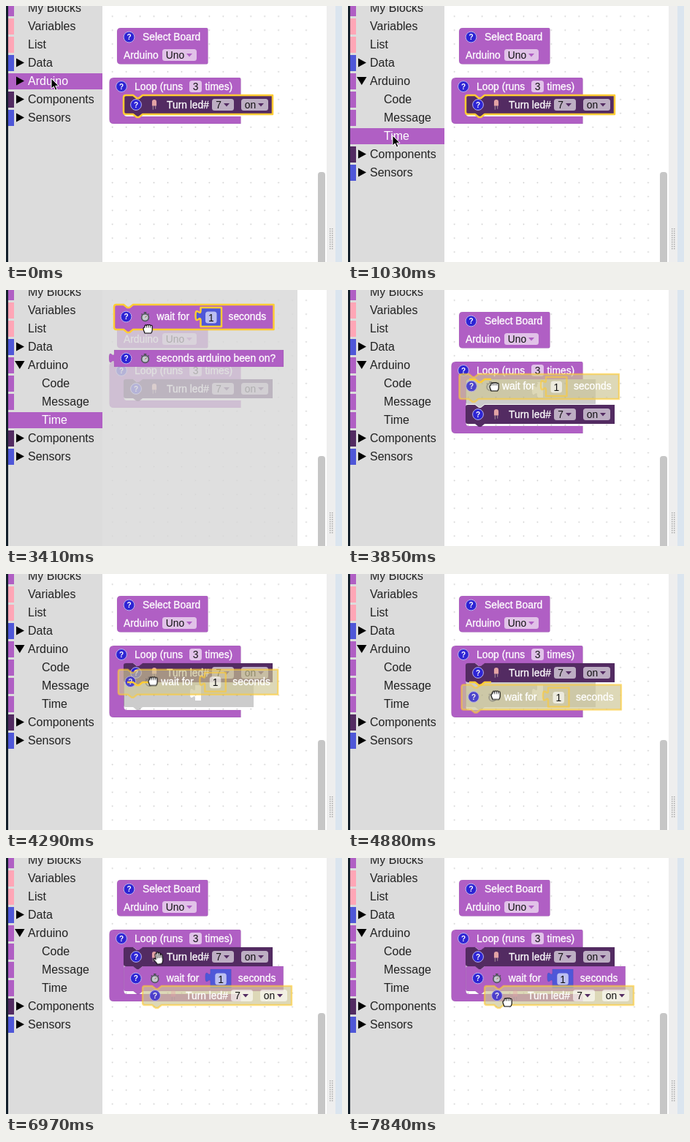
An HTML page for the animation above (7990 ms loop, 460 by 350 pixels).

```html
<!DOCTYPE html>
<html lang="en">
<head>
<meta charset="utf-8">
<title>Block editor</title>
<style>
html, body { margin: 0; width: 100%; height: 100%; overflow: hidden; background: #fff; }
svg { display: block; width: 460px; height: 350px; }
text { font-family: "Liberation Sans", Arial, sans-serif; font-size: 13.85px; white-space: pre; }
.row { font-size: 16px; fill: #222; }
.label { fill: #fff; stroke: #fff; stroke-width: .3px; }
.value { fill: #111; text-anchor: middle; }
.mark { font-size: 10px; font-weight: bold; fill: #fff; text-anchor: middle; }
.body { stroke: #000; stroke-opacity: .08; stroke-width: .8px; }
.sel { fill: none; stroke: #fc3; stroke-width: 2.5px; stroke-linejoin: round; }
.ghost .body { fill: #cdc696; fill-opacity: .68; stroke: none; }
.ghost .sel { stroke-opacity: .6; }
.ghost .help { opacity: .8; }
.ghost .pic { opacity: .4; }
.hand { fill: #fff; stroke: #000; stroke-width: 1.1px; stroke-linejoin: round; }
.fingers { stroke: #000; stroke-width: .8px; }
</style>
</head>
<body>
<svg id="stage" viewBox="0 0 460 350"></svg>
<script>
const LOOP = 7990, TICKS = 54;
const PURPLE = '#b05fc4', DARK = '#532b62', BLUE = '#4f57d8', PINK = '#ffa6b6';

// Drawing helpers
const at = (x, y, content) => `<g transform="translate(${x} ${y})">${content}</g>`;
const g = (id, content, x = 0, y = 0) => `<g id="${id}">${at(x, y, content)}</g>`;
const rect = (x, y, w, h, fill, r = 0) =>
  `<rect x="${x}" y="${y}" width="${w}" height="${h}" rx="${r}" fill="${fill}"/>`;
const label = (x, y, s) => `<text class="label" x="${x}" y="${y}">${s}</text>`;
const body = (d, fill) => `<path class="body" d="${d}" fill="${fill}"/>`;
const outline = d => `<path class="sel" d="${d}"/>`;

const help = (x, y) => `<g class="help"><circle cx="${x}" cy="${y}" r="7.4" fill="#2d24d4" stroke="#b9b4ee"/>
  <text class="mark" x="${x}" y="${y + 3.6}">?</text></g>`;

const field = (x, y, w, s, arrow) => rect(x, y, w, 16, 'rgba(255,255,255,.62)', 3.5) +
  `<text class="value" x="${x + (w - (arrow ? 12 : 0)) / 2}" y="${y + 13}">${s}</text>` +
  (arrow ? `<path d="M${x + w - 14} ${y + 6}h8l-4 4.5z" fill="${arrow}"/>` : '');

const watch = (x, y) => `<g class="pic" transform="translate(${x} ${y})">
  <path d="M-1.8 -5.8h3.6M0 -5.5v2M4 -4l1 1M-4 -4l-1 1" stroke="#4a4c55" stroke-width="1.6"/>
  <circle cy="1" r="4.9" fill="#c3c9cf" stroke="#55575f" stroke-width="1.7"/>
  <path d="M0 1L2 -1" stroke="#a44"/></g>`;

const bulb = (x, y) => `<g class="pic" transform="translate(${x} ${y}) scale(.85)">
  <path d="M-2 3v6M2 3v5" stroke="#a58f98" stroke-width="1.2"/>
  <path d="M-3.6 3V-3.5a3.6 3.6 0 0 1 7.2 0V3z" fill="#e3a3a5"/></g>`;

// Block outlines
const stack = (w, h) => `M3 0H13l5 4h3l5 -4H${w}V${h}H26l-5 4h-3l-5 -4H3q-3 0 -3 -3V3q0 -3 3 -3z`;
const plain = (w, h) => `M5 0H${w - 2}q2 0 2 2V${h - 2}q0 2 -2 2H5q-5 0 -5 -5V5q0 -5 5 -5z`;
const plug = (x, y, w, h) => `M${x + w} ${y}H${x}v4c0 9 -7 -7 -7 7s7 -2 7 7V${y + h}H${x + w}z`;
const cShape = h => `M6 0H178q2 0 2 2V24H46l-5 4h-3l-5 -4H24q-4 0 -4 4V${h - 14}q0 4 4 4H180V${h}H6q-6 0 -6 -6V6q0 -6 6 -6z`;

const WAIT = stack(218.5, 34), LED = stack(204, 26), NUM = plug(118.5, 4, 28.5, 26);

const waitBlock = ghost => body(WAIT, PURPLE) + (ghost ? '' : body(NUM, BLUE)) +
  help(16.5, 16.5) + watch(42.5, 16.5) + label(58.5, 21, 'wait for') +
  field(125, 9.5, 15.5, '1') + label(156.5, 21, 'seconds');

const ledBlock = () => body(LED, DARK) + help(17, 13) + bulb(42, 12) + label(59, 18, 'Turn led#') +
  field(121, 5, 30, '7', DARK) + field(161, 5, 37, 'on', DARK);

// Toolbox: rows are 25px apart
const rowY = i => 2.5 + 25 * i;
const closed = i => `<path d="M14 ${rowY(i) - 6}v12l11 -6z"/>`;
const row = (i, color, s, x = 30) => rect(3, rowY(i) - 10.5, 8, 22, color) +
  `<text class="row" x="${x}" y="${rowY(i) + 5.5}">${s}</text>`;
const active = (i, s, x) => rect(3, rowY(i) - 10.5, 129, 22, PURPLE) +
  `<text class="row" style="fill:#fff" x="${x}" y="${rowY(i) + 5.5}">${s}</text>`;

const topRows = [[PURPLE, 'My Blocks'], [PINK, 'Variables'], [PINK, 'List'], [BLUE, 'Data'], [PURPLE, 'Arduino']];
const toolbox = rect(0, 0, 3, 350, '#14202b') + rect(3, 0, 129, 350, '#dcdcdc') +
  topRows.map(([color, s], i) => row(i, color, s)).join('') + closed(3) +
  g('kids', ['Code', 'Message', 'Time'].map((s, i) => row(5 + i, PURPLE, s, 49)).join('')) +
  g('tail', row(5, DARK, 'Components') + closed(5) + row(6, BLUE, 'Sensors') + closed(6)) +
  g('onArduino', active(4, 'Arduino', 30)) + g('onTime', active(7, 'Time', 49)) +
  g('shut', closed(4)) + g('open', '<path d="M12 97h13.5l-6.75 11z"/>');

const workspace = `<defs><pattern id="dots" x="136.2" y="4.5" width="18.95" height="18.95" patternUnits="userSpaceOnUse">
  <circle cx="9.5" cy="9.5" r=".85" fill="#c4c4c4"/></pattern></defs>` +
  rect(132, 0, 295, 350, 'url(#dots)') +
  at(152, 30, body(plain(124.5, 49.5), PURPLE) + help(16.5, 12.5) + label(35, 17, 'Select Board') +
    label(9, 42, 'Arduino') + field(62, 29, 47, 'Uno', PURPLE)) +
  g('loopShort', body(cShape(63), PURPLE), 141.5, 98) + g('loopLong', body(cShape(98), PURPLE), 141.5, 98) +
  at(141, 98, help(17, 12) + label(35, 17, 'Loop (runs') + field(110, 4, 17, '3') + label(131.5, 17, 'times)')) +
  g('marker', `<path d="${stack(178, 34)}${plug(98, 4, 8, 21)}" fill-opacity=".2" fill-rule="evenodd"/>`, 161, 122) +
  g('wait', waitBlock(), 161.3, 148) + g('waitSel', outline(WAIT) + outline(NUM), 161.3, 148) +
  g('led', ledBlock(), 161, 122) + g('ledSel', outline(LED), 161, 122) +
  `<g class="ghost">${g('drag', waitBlock(true) + outline(WAIT) + outline(NUM)) +
    g('copy', ledBlock() + outline(LED), 187, 175)}</g>` +
  g('snap', outline('M5 0H13l5 4h3l5 -4H35'), 161, 122);

const flyout = g('flyout', rect(132, 0, 267, 350, 'rgba(216,216,216,.8)') +
  at(148, 20, waitBlock()) +
  at(148, 82, body(plug(0, 0, 232, 23), PURPLE) + help(16.5, 11.5) + watch(42.5, 11.5) +
    label(58, 16, 'seconds arduino been on?'))) +
  g('pickSel', outline(WAIT), 148, 20) + g('numSel', outline(NUM), 148, 20);

let grip = '';
for (let y = 304; y < 334; y += 3) grip += rect(443, y, 1.5, 1.5, '#aaa') + rect(446, y, 1.5, 1.5, '#aaa');
const frame = g('thumb', rect(427, 0, 10, 400, '#c6c6c6', 4)) +
  rect(439, 0, 12, 350, '#eeeeee') + rect(451, 0, 9, 350, '#dbe5ef') + grip;

const palm = `<g transform="rotate(-10)"><path class="hand" d="M-3 8C-4 5 -7 2 -7 0q1 -2 3 1V-6q1 -2 2.3 0V-7.5q1.2 -2 2.4 0V-6.5q1.2 -2 2.3 0V-4q1.5 -1.5 2.3 0V2q0 3 -2 6z"/>
  <path class="fingers" d="M-1.7 -5v5M.7 -6v6M3 -5v5"/></g>`;
const fist = `<path class="hand" d="M-4 6C-5 3 -6 2 -6 0q0 -2 2 -2v-2q1 -2 2.6 -.5q1 -1.8 2.6 -.3q1.2 -1.5 2.6 .2q2.4 -.8 2.4 1.5V2q0 2 -1.5 4z"/>
  <path class="fingers" d="M-1.4 -4v2.5M1.2 -4.5v3M3.8 -4v2.5"/>`;
const cursors =
  g('arrow', '<path d="M0 0V14l3.3 -3 2.3 5.2 2.4 -1 -2.3 -5h4.4z" stroke="#fff"/>') +
  g('hand', g('palm', palm) + g('fist', fist));

document.getElementById('stage').innerHTML = workspace + frame + flyout + toolbox + cursors;

// Time runs in ticks; keys are slightly early so rounding never delays a change
const anims = {};
let css = '';
const percent = tick => Math.max(0, tick / TICKS * 100 - 10 / LOOP * 100).toFixed(3);

function track(id, kind, keys) {
  const first = keys[0], last = keys[keys.length - 1];
  const all = [[0, first[1]], ...keys.filter(k => k[0] > 0)];
  css += `@keyframes ${id}-${kind}{` +
    all.map(([tick, rule], i) => {
      const n = i + 1 < all.length ? all[i + 1][0] - tick : 1;
      const timing = kind === 'glide' ? `;animation-timing-function:steps(${n},end)` : '';
      return `${percent(tick)}%{${rule}${timing}}`;
    }).join('') + `100%{${last[1]}}}\n`;
  (anims[id] ||= []).push(`${id}-${kind} ${LOOP}ms step-end infinite`);
}

// Visible from the first time to the second, and so on
function show(id, ...times) {
  const keys = times.map((t, i) => [t, `visibility:${i % 2 ? 'hidden' : 'visible'}`]);
  track(id, 'show', times[0] > 0 ? [[0, 'visibility:hidden'], ...keys] : keys);
}
const places = points => points.map(([t, x, y]) => [t, `transform:translate(${x}px,${y}px)`]);
const hop = (id, ...points) => track(id, 'hop', places(points));
const glide = (id, ...points) => track(id, 'glide', places(points));

const OPEN = 1, PICK_TIME = 7, FLYOUT = 8, PRESS = 21, LIFT = 24, SNAP = 26, BELOW = 29, DROP = 34, SELECT = 38, PASTE = 47;

show('kids', OPEN);
show('open', OPEN);
show('shut', 0, OPEN);
hop('tail', [0, 0, 0], [OPEN, 0, 75]);
show('onArduino', 0, PICK_TIME);
show('onTime', PICK_TIME, LIFT);
show('flyout', FLYOUT, LIFT);
show('pickSel', 18, LIFT);
show('numSel', PRESS, LIFT);

show('loopShort', 0, SNAP);
show('loopLong', SNAP);
for (const id of ['marker', 'snap']) {
  show(id, SNAP, DROP);
  hop(id, [0, 0, 0], [BELOW, 0, 26]);
}
hop('led', [0, 0, 0], [SNAP, 0, 35], [BELOW, 0, 0]);
show('ledSel', 0, PRESS, SELECT, PASTE);
show('wait', DROP);
show('waitSel', DROP, SELECT);
show('copy', PASTE);
hop('thumb', [0, 0, 227], [DROP, 0, 214], [PASTE, 0, 212]);

show('drag', LIFT, DROP);
glide('drag', [23, 148, 20], [SNAP, 152.5, 115], [33, 155.5, 151.5]);

show('arrow', 0, 15);
glide('arrow', [3, 62, 99], [PICK_TIME, 61, 177], [11, 61, 177], [15, 225, -10]);

show('palm', 17, PRESS, DROP, 53);
show('fist', PRESS, DROP, 53);
glide('hand', [16, 194, 36], [19, 194, 53], [23, 194, 53], [SNAP, 200, 132], [33, 202, 165.5],
  [40, 209, 137], [48, 209, 137], [53, 218, 197]);

for (const id in anims) css += `#${id}{animation:${anims[id].join(',')}}\n`;
document.head.appendChild(document.createElement('style')).textContent = css;
</script>
</body>
</html>
```
